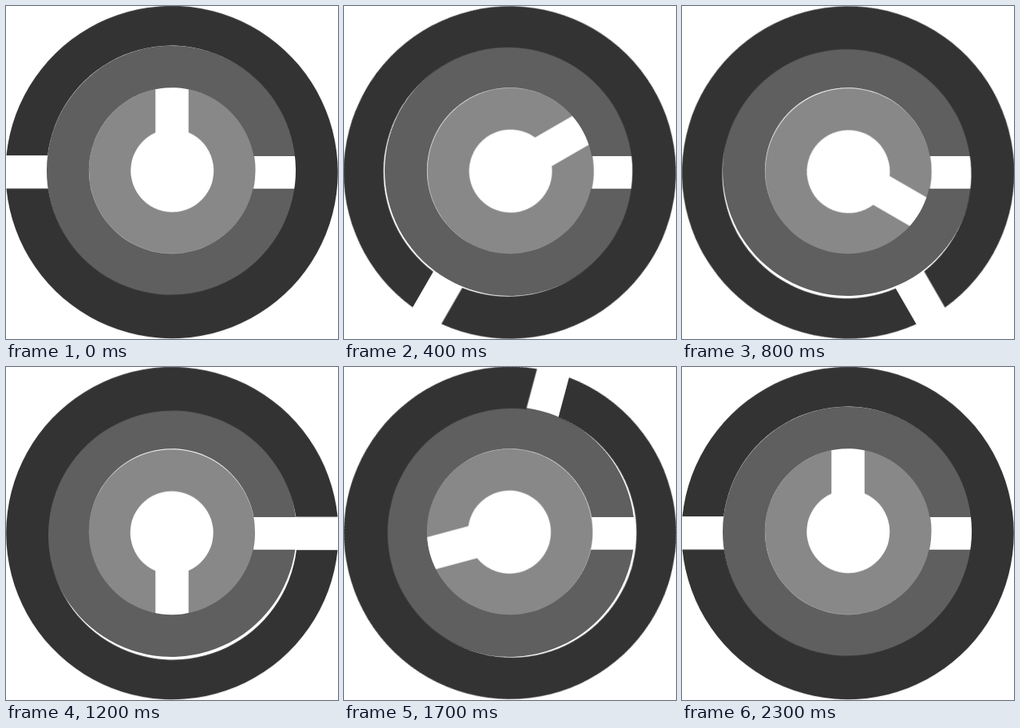
An HTML page that plays this animation: 416x417 px, repeating every 2400 ms.

```html
<!DOCTYPE html>
<html lang="en">
<head>
<meta charset="utf-8">
<title>Turning rings</title>
<style>
  html, body { margin: 0; width: 100%; height: 100%; overflow: hidden; background: #fff; }
  svg { display: block; width: 416px; height: 417px; }
  path { transform-origin: 0 0; }
</style>
</head>
<body>
<svg viewBox="0 0 416 417">
  <g transform="translate(208 206.8)"><path id="inner" fill="#888"/></g>
  <g transform="translate(207.5 206.4)"><path id="middle" fill="#5f5f5f"/></g>
  <g transform="translate(208 208.15)"><path id="outer" fill="#333"/></g>
</svg>
<script>
const STEP = 100, COUNT = 24, LOOP = STEP * COUNT;

// Where a horizontal line at height y leaves a circle on its right side.
const edge = (c, y) => c.x + Math.sqrt(c.r * c.r - (y - c.y) ** 2);

// Open ring with a straight slot to the right, centred on slotY.
function openRing(rim, hole, half, slotY = 0) {
  const lo = slotY + half, hi = slotY - half;
  return `M${edge(rim, lo)} ${lo}A${rim.r} ${rim.r} 0 1 1 ${edge(rim, hi)} ${hi}` +
         `L${edge(hole, hi)} ${hi}A${hole.r} ${hole.r} 0 1 0 ${edge(hole, lo)} ${lo}Z`;
}

const circle = (x, y, r) => ({ x, y, r });
const byId = id => document.getElementById(id);

byId("inner").setAttribute("d", openRing(circle(.7, .3, 104.3), circle(.7, .3, 52), 20.8));
byId("middle").setAttribute("d", openRing(circle(0, 0, 156.5), circle(.4, -.2, 104), 20.4, 2));
byId("outer").setAttribute("d", openRing(circle(.4, 0, 208.2), circle(1, 2.4, 156), 20.7, .2));

// Steady 15 degree steps, with uneven steps near the end of the turn.
function turns(late) {
  return Array.from({ length: COUNT }, (_, i) => late[i] ?? i * 15);
}

function spin(id, start, dir, late) {
  const frames = turns(late).map((a, i) => ({
    transform: `rotate(${start + dir * a}deg)`, offset: i / COUNT, easing: "step-end"
  }));
  frames.push({ transform: frames[COUNT - 1].transform, offset: 1 });
  byId(id).animate(frames, { duration: LOOP, iterations: Infinity });
}

spin("inner", -90, 1, { 23: 360 });
spin("outer", 180, -1, { 19: 285, 20: 285, 21: 300, 22: 330, 23: 360 });
</script>
</body>
</html>
```
